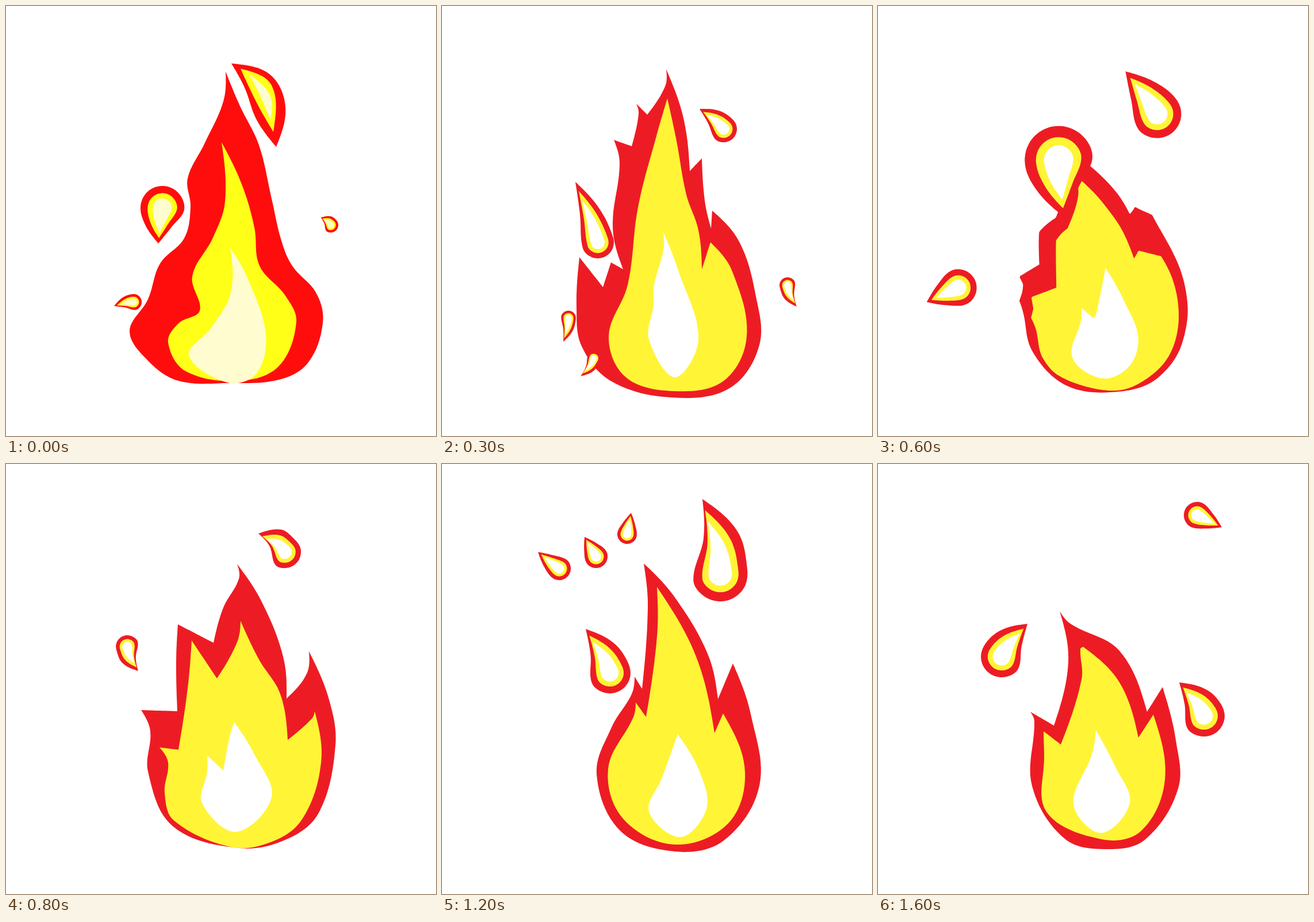
Animation of 748 by 748 pixels, one loop 1700 ms. Source, as an HTML page:

```html
<!DOCTYPE html>
<html lang="en">
<head>
<meta charset="utf-8">
<title>Flame</title>
<style>
html, body { margin: 0; width: 100%; height: 100%; overflow: hidden; background: #fff; }
svg { display: block; width: 100vw; height: 100vh; }
</style>
</head>
<body>
<svg viewBox="0 0 748 748"></svg>
<script>
const STEP = 100, COUNT = 17;
const WARM = ['#ff0d0d', '#ffff17', '#fffccf'];
const BRIGHT = ['#ed1c24', '#fff436', '#fff'];

const lerp = (a, b, k) => a + (b - a) * k;
const mix = (p, q, k) => [lerp(p[0], q[0], k), lerp(p[1], q[1], k)];
const dist = (p, q) => Math.hypot(p[0] - q[0], p[1] - q[1]);
const point = (x, y, corner) => Object.assign([x, y], { corner });

// "x,y" pairs run clockwise from the tip; a trailing "c" marks a sharp corner.
const parse = text => text.split(' ').map(s =>
  point(...s.split(',').map(parseFloat), s.endsWith('c')));

// Smooth closed curve through the points, flattened to short chords.
function outline(pts) {
  const n = pts.length, out = [];
  const handle = (before, p, after) => {
    if (p.corner) return null;
    const d = dist(p, after), k = d / (dist(before, p) + d) / 3 * 1.1;
    return [p[0] + (after[0] - before[0]) * k, p[1] + (after[1] - before[1]) * k];
  };
  pts.forEach((p, i) => {
    const q = pts[(i + 1) % n];
    let a = handle(pts[(i + n - 1) % n], p, q);
    let b = handle(pts[(i + 2) % n], q, p);
    if (!a) a = mix(p, b || q, .5);
    if (!b) b = mix(q, a, .5);
    for (let j = 0; j < 12; j++) {
      const t = j / 12, m = mix(a, b, t);
      out.push(mix(mix(mix(p, a, t), m, t), mix(m, mix(b, q, t), t), t));
    }
  });
  return out;
}

// Teardrop from its tip to a round end at (cx, cy); bend shifts the waist sideways.
function teardrop(tx, ty, cx, cy, r, bend) {
  const layer = (sl, sr) => {
    const len = dist([tx, ty], [cx, cy]), ux = (cx - tx) / len, uy = (cy - ty) / len;
    const R = r * sr, L = len * sl;
    const at = (u, v, corner) => point(cx + ux * u + uy * v, cy + uy * u - ux * v, corner);
    const waist = side => at(-L / 2, R * (bend + side * .62));
    const round = [90, 45, 0, -45, -90].map(deg => {
      const a = deg * Math.PI / 180;
      return at(R * Math.cos(a), R * Math.sin(a));
    });
    return outline([at(-L, 0, true), waist(1), ...round, waist(-1)]);
  };
  return [layer(1, 1), layer(.85, .67), layer(.7, .43)];
}

function resample(line, count) {
  const len = [0];
  for (let i = 1; i < line.length; i++) len.push(len[i - 1] + dist(line[i - 1], line[i]));
  const out = [];
  for (let j = 0, i = 0; j < count; j++) {
    const at = len[len.length - 1] * j / count;
    while (len[i + 1] < at) i++;
    out.push(mix(line[i], line[i + 1], (at - len[i]) / (len[i + 1] - len[i] || 1)));
  }
  return out;
}

// Both sides are spaced evenly between the tip and the base.
function sides(line) {
  let base = 0;
  line.forEach((p, i) => { if (dist(p, line[0]) > dist(line[base], line[0])) base = i; });
  return [...resample(line.slice(0, base + 1), 160), ...resample([...line.slice(base), line[0]], 160)];
}

const shapes = (...texts) => texts.map(t => outline(parse(t)));
const poses = [];
function pose(step, flame, drops, colors = BRIGHT) {
  poses.push({ step, flame, even: flame.map(sides), drops, colors });
}

const leaf = shapes(
  '392,100c 459,119 486,175 470,245c 436,198 415,142',
  '408,109c 462,138 465,219c 437,170',
  '423,119c 459,155 460,198c 440,152');

pose(0, shapes(
  '382,114c 407,174 440,242 462,335 479,408 498,452 540,500 551,552 525,621 475,650 385,656 300,652 248,618 215,566 247,510 268,448 310,404 321,350 316,300 345,240 378,166',
  '375,237c 410,310 432,385 441,452 486,504 505,550 474,627 405,652 312,635 282,585 300,552 337,530 324,470 360,403 381,340',
  '390,421c 420,473 452,572 435,640 385,655 318,608 358,558 391,498'
), [
  leaf,
  teardrop(265, 413, 272, 351, 38, .1),
  teardrop(548, 368, 565, 381, 13, .25),
  teardrop(188, 522, 222, 515, 14, .2)
], WARM);

pose(3, shapes(
  '390,110c 420,195 431,287c 452,265c 457,338 468,387c 470,356c 517,410 545,500 552,590 500,665 400,681 295,653 243,592 234,525 239,437c 280,489c 294,446c 315,458c 297,385 309,275 299,233c 330,244c 342,188 338,170c 357,189c 388,140',
  '392,161c 408,235 425,328 446,390 452,458c 467,411c 505,462 530,575 490,652 405,670 320,646 290,575 323,485 341,350 373,226',
  '385,393c 411,460 446,580 405,646 360,580 368,520 369,485 385,425'
), [
  teardrop(448, 179, 490, 214, 23, .2),
  teardrop(232, 306, 271, 411, 28, .18),
  teardrop(617, 523, 601, 486, 14, .35),
  teardrop(211, 584, 220, 543, 13, -.27),
  teardrop(241, 644, 264, 613, 12, -.4)
]);

pose(5, shapes(
  '292,288c 345,310 388,338 414,367c 424,322c 455,388 506,470 525,545 495,638 435,673 345,676 272,625 245,535 220,500c 273,502c 274,425 306,340',
  '312,306c 370,347 424,433c 431,401c 497,478 511,580 455,656 385,670 295,635 263,560 248,523c 308,535c 304,430 322,345',
  '395,458c 425,515 447,575 437,630 390,652 336,622 355,553 356,534c 377,552c 392,485'
), [
  teardrop(432, 126, 487, 200, 42, .1),
  teardrop(375, 346, 366, 247, 59, .1),
  null,
  teardrop(107, 525, 162, 500, 32, 0)
]);

pose(8, shapes(
  '402,174c 445,240 482,335 488,408c 523,365 527,326c 562,410 573,490 545,605 490,652 405,668 290,630 247,535 251,465 235,428c 298,430c 296,345 299,279c 361,311c 378,250 405,200',
  '408,273c 440,340 477,400 490,480c 532,443 537,430c 548,520 515,618 460,658 390,666 292,620 276,572 282,520 267,493c 300,497c 316,390 323,307c 367,373c 402,310',
  '397,449c 432,505 462,580 400,640 341,590 350,535 350,507c 378,533c 389,475'
), [
  teardrop(439, 121, 485, 153, 28, .38),
  teardrop(230, 360, 211, 318, 20, .33)
]);

pose(10, shapes(
  '317,200c 358,240 377,263c 384,231c 437,312 457,381c 474,342c 522,438 540,545 497,638 400,666 300,628 265,545 275,455 266,415c 292,433c 318,330 329,260',
  '337,234c 379,318c 379,291c 432,367 453,432c 473,400c 508,470 520,570 460,643 400,652 307,608 288,515 286,451c 309,476c 325,360 341,275',
  '406,469c 428,515 446,585 400,642 364,605 397,542'
), [
  teardrop(454, 83, 491, 124, 28, .27),
  teardrop(276, 273, 297, 334, 26, .3),
  teardrop(492, 250, 491, 305, 22, 0),
  teardrop(208, 378, 225, 414, 19, .2)
]);

pose(12, shapes(
  '351,173c 405,232 462,330 480,409c 506,347c 537,435 552,560 490,655 405,674 310,638 269,540 295,458 330,400 335,370c 348,391c 358,250',
  '374,214c 442,335 474,468c 489,434c 527,535 498,625 405,662 315,617 289,530 333,440 337,415c 355,440c 374,300',
  '410,470c 448,535 460,600 415,649 360,605 383,545'
), [
  teardrop(453, 61, 484, 191, 48, .33),
  teardrop(250, 287, 292, 363, 36, .22),
  null,
  teardrop(167, 153, 204, 182, 20, -.05),
  teardrop(248, 127, 268, 161, 20, 0),
  teardrop(329, 85, 322, 122, 17, 0)
]);

pose(16, shapes(
  '316,256c 335,278 420,325 468,431c 495,388c 518,480 522,565 465,653 400,670 325,652 268,560 272,448 265,431c 306,455c 331,345',
  '357,318c 420,380 453,476c 479,436c 499,550 458,638 390,653 293,605 289,505 288,465c 318,488c 354,375 352,322',
  '379,463c 412,525 438,590 388,642 340,592 372,505'
), [
  teardrop(598, 110, 555, 89, 23, 0),
  teardrop(260, 278, 215, 335, 36, -.18),
  teardrop(524, 380, 567, 438, 36, .2)
]);

const draw = (line, dx = 0, dy = 0) =>
  'M' + line.map(p => (p[0] + dx).toFixed(1) + ',' + (p[1] + dy).toFixed(1)).join(' ') + 'Z';

function center(line) {
  const xs = line.map(p => p[0]), ys = line.map(p => p[1]);
  return [(Math.min(...xs) + Math.max(...xs)) / 2, (Math.min(...ys) + Math.max(...ys)) / 2];
}

// Flames morph between poses; drops glide to their partner or drift outwards.
function build(step) {
  const i = poses.filter(p => p.step <= step).length - 1;
  const a = poses[i], b = poses[i + 1] || a;
  const k = a === b ? 0 : (step - a.step) / (b.step - a.step);
  const [near, far, w] = k <= .5 ? [a, b, k] : [b, a, 1 - k];
  const flame = a.flame.map((line, n) =>
    draw(k ? a.even[n].map((p, j) => mix(p, b.even[n][j], k)) : line));
  const drops = ['', '', ''];
  near.drops.forEach((drop, slot) => {
    if (!drop) return;
    const c = center(drop[0]), mate = far.drops[slot], drift = step - near.step;
    const to = mate ? mix(c, center(mate[0]), w) : [c[0] + (c[0] - 374) * .1 * drift, c[1] - 10 * drift];
    drop.forEach((line, n) => { drops[n] += draw(line, to[0] - c[0], to[1] - c[1]); });
  });
  return { paths: [...flame, ...drops], colors: k ? BRIGHT : a.colors };
}

const frames = Array.from({ length: COUNT }, (_, i) => build(i));
const svg = document.querySelector('svg');
const layers = frames[0].paths.map(() =>
  svg.appendChild(document.createElementNS(svg.namespaceURI, 'path')));
let shown = -1;

function render(now) {
  const step = Math.floor(now / STEP) % COUNT;
  if (step === shown) return;
  shown = step;
  const { paths, colors } = frames[step];
  layers.forEach((el, i) => {
    el.setAttribute('d', paths[i]);
    el.setAttribute('fill', colors[i % 3]);
  });
}

const start = performance.now();
function tick(now) {
  render(Math.max(0, now - start));
  requestAnimationFrame(tick);
}
render(0);
requestAnimationFrame(tick);
</script>
</body>
</html>
```
